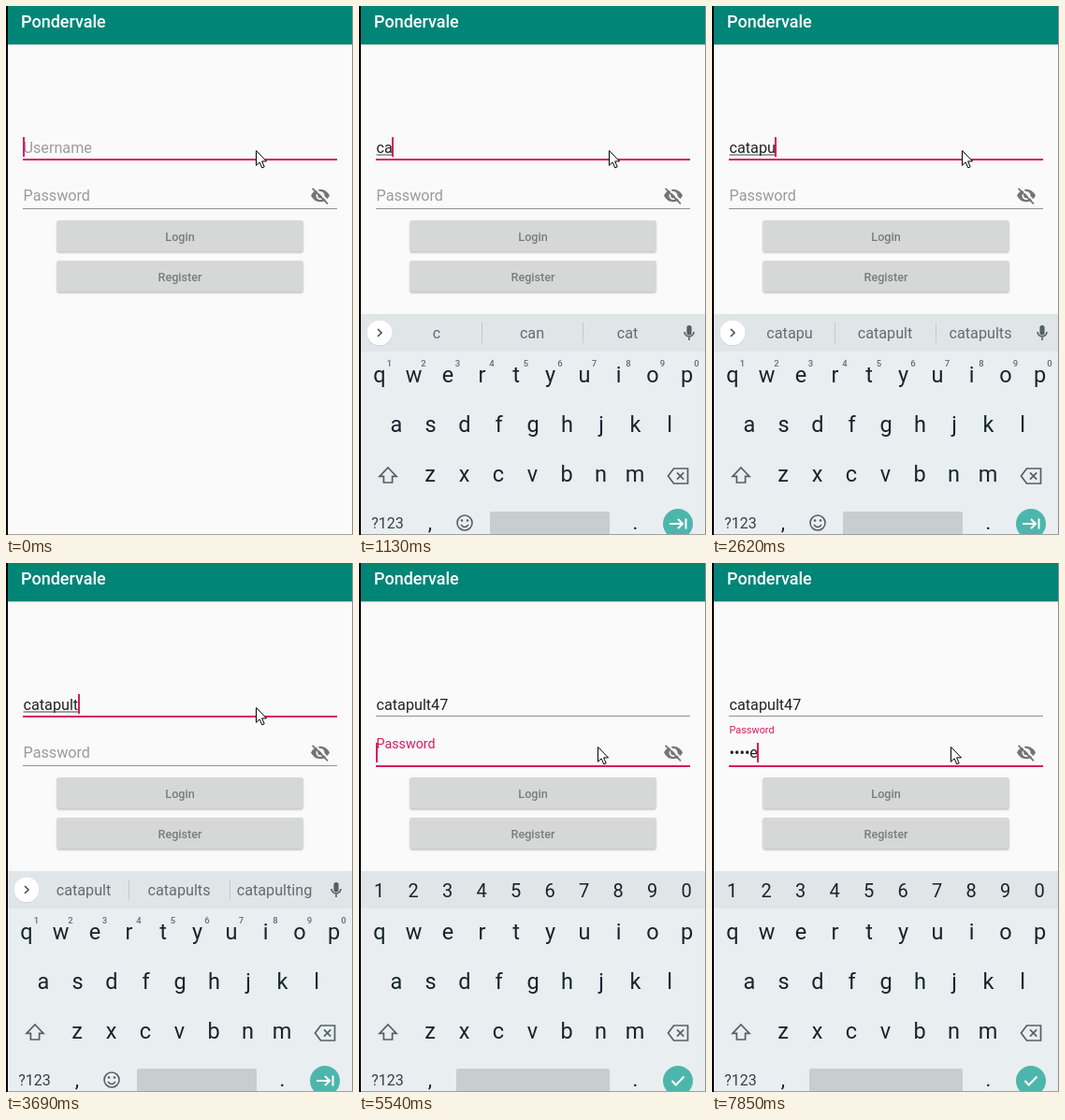
Recreate the animation shown at these times as an HTML page with a canvas. Size 371x565 px, loop 8 s.

```html
<!DOCTYPE html>
<html lang="en">
<head>
<meta charset="utf-8">
<title>Login form</title>
<style>
html, body { margin: 0; width: 100%; height: 100%; overflow: hidden; background: #fafafa; }
canvas { display: block; width: 371px; height: 565px; }
</style>
</head>
<body>
<canvas id="stage"></canvas>
<script>
const W = 371, H = 565, LOOP = 8000;
const canvas = document.getElementById('stage');
const ctx = canvas.getContext('2d');
const dpr = window.devicePixelRatio || 1;
canvas.width = W * dpr;
canvas.height = H * dpr;

const PINK = '#d81b60', INK = '#212121', HINT = '#9b9b9b', KEY = '#17252c', ICON = '#526067';
const USER = 'catapult47', SECRET = 'mouse';
const FIELD_X = 18.5, FIELD_FONT = 16.2;

// start time, typed letters
const typed = [[160, 1], [1130, 2], [1360, 3], [2200, 4], [2450, 5], [2620, 6],
  [2830, 7], [3690, 8], [4030, 9], [4210, 10]];
const secretTyped = [[6550, 1], [6990, 2], [7300, 3], [7570, 4], [7850, 5]];
const hints = [
  [230, 'c can cat'], [1180, 'ca can car'], [1360, 'cat cats catalog'],
  [2200, 'cata catalog catch'], [2450, 'catap catapult catalog'],
  [2620, 'catapu catapult catapults'], [2830, 'catapul catapult catapults'],
  [3690, 'catapult catapults catapulting'], [4030, 'catapult4'], [4210, USER]];
const caretOff = [[660, 1130], [1850, 2200], [3270, 3690], [4710, 5210], [5980, 6490]];

const PRESS = 5270, FOCUS = 5490, SWAP = 5540;

const clamp = v => Math.max(0, Math.min(1, v));
const lerp = (a, b, p) => a + (b - a) * p;
const at = (list, t, none) => list.reduce((v, e) => t >= e[0] ? e[1] : v, none);

function rect(x, y, w, h, color, r = 0) {
  ctx.fillStyle = color;
  ctx.beginPath();
  ctx.roundRect(x, y, w, h, r);
  ctx.fill();
}

function disc(x, y, r, color) {
  ctx.fillStyle = color;
  ctx.beginPath();
  ctx.arc(x, y, r, 0, 7);
  ctx.fill();
}

function text(str, x, y, size, color, align = 'left', weight = 400) {
  ctx.font = `${weight} ${size}px Roboto, sans-serif`;
  ctx.textAlign = align;
  ctx.fillStyle = color;
  ctx.fillText(str, x, y);
}

function widthOf(str) {
  ctx.font = `400 ${FIELD_FONT}px Roboto, sans-serif`;
  return ctx.measureText(str).width;
}

function stroke(path, x, y, color, width = 1.7) {
  ctx.save();
  ctx.translate(x, y);
  ctx.strokeStyle = color;
  ctx.lineWidth = width;
  ctx.stroke(new Path2D(path));
  ctx.restore();
}

function fill(path, x, y, color) {
  ctx.save();
  ctx.translate(x, y);
  ctx.fillStyle = color;
  ctx.fill(new Path2D(path), 'evenodd');
  ctx.restore();
}

function eyeOff(x, y) {
  const c = '#747474';
  fill('M-10 0Q-6.5 -6.8 0 -6.8T10 0Q6.5 6.8 0 6.8T-10 0Z' +
    'M-4.5 0A4.5 4.5 0 0 0 4.5 0A4.5 4.5 0 0 0 -4.5 0Z', x, y, c);
  disc(x, y, 2.7, c);
  stroke('M-7 -9.5L9.5 7', x, y, '#fafafa', 2);
  stroke('M-8.4 -7.6L8 8.8', x, y, c, 1.8);
}

function button(label, y) {
  ctx.save();
  ctx.shadowColor = 'rgba(0,0,0,.28)';
  ctx.shadowBlur = 2 * dpr;
  ctx.shadowOffsetY = dpr;
  rect(54.5, y, 263, 33.5, '#d6d7d7', 2);
  ctx.restore();
  text(label, 186, y + 21.5, 12.6, '#7b7c7c', 'center', 500);
}

function line(y, active) {
  if (active) rect(18, y, 336, 2, PINK);
  else rect(18, y, 336, 1, '#919191');
}

function form(t) {
  const focused = t >= FOCUS;
  const name = USER.slice(0, at(typed, t, 0));
  const n = at(secretTyped, t, 0);
  const secret = n ? '•'.repeat(n - 1) + SECRET[n - 1] : '';

  text(name || 'Username', FIELD_X, 157, FIELD_FONT, name ? INK : HINT);
  if (name && !focused) rect(FIELD_X, 158.5, widthOf(name), 1, '#444');
  line(163, !focused);

  const p = clamp((t - FOCUS + 30) / 200);
  const e = focused ? p * p * (3 - 2 * p) : 0;
  text('Password', FIELD_X, lerp(207.5, 181.5, e), lerp(FIELD_FONT, 10.9, e), focused ? PINK : HINT);
  text(secret, FIELD_X, 208, FIELD_FONT, INK);
  line(216, t >= PRESS);
  eyeOff(336, 202.5);

  if (!caretOff.some(([a, b]) => t >= a && t < b)) {
    const x = FIELD_X + widthOf(focused ? secret : name);
    rect(Math.round(x - .5), focused ? 192 : 140, 2, 21, PINK);
  }
  button('Login', 229);
  button('Register', 272);
}

function mic(x, y) {
  rect(x - 2.6, y - 8, 5.2, 10.5, ICON, 2.6);
  stroke('M-5 -1A5 5 0 0 0 5 -1M0 4V8', x, y, ICON, 1.6);
}

function chevron(dir) {
  disc(22, 350, 13.5, 'rgba(0,0,0,.08)');
  disc(22, 349, 13.3, '#fff');
  stroke(`M${-2 * dir} -4L${2 * dir} 0L${-2 * dir} 4`, 22, 349, '#455158', 1.6);
}

function tools() {
  chevron(-1);
  stroke('M2.6 0A4.6 4.6 0 1 0 -6.6 0A4.6 4.6 0 1 0 2.6 0M1.4 3.3L6.8 8.4', 72, 347.5, ICON, 1.8);
  stroke('M-6.5 -4.5Q-6.5 -6.5 -4.5 -6.5H4.5Q6.5 -6.5 6.5 -4.5V2L2 6.5H-4.5Q-6.5 6.5 -6.5 4.5Z' +
    'M6 2H2V6M-3.5 1Q-1 4 2 1', 126, 349, ICON, 1.6);
  disc(123.5, 347, 1.1, ICON);
  disc(128.5, 347, 1.1, ICON);
  text('GIF', 179, 353, 12, ICON, 'center', 900);
  rect(227, 342, 14, 14, ICON, 1);
  rect(267, 338, 1, 22, '#c3c9cc');
  for (let i = -1; i < 2; i++) disc(300 + i * 5.5, 349.5, 1.8, ICON);
  mic(353, 349);
}

function suggestions(words) {
  chevron(1);
  if (words.length === 1) {
    text(words[0], 185, 355, 16.2, '#636c71', 'center');
  } else {
    words.forEach((w, i) => text(w, 83 + i * 102, 355, 16.2, '#636c71', 'center'));
    rect(131, 338, 1, 22, '#c3c9cc');
    rect(239, 338, 1, 22, '#c3c9cc');
  }
  mic(353, 349);
}

function keyRow(letters, x, y, size = 23.5) {
  [...letters].forEach((c, i) => text(c, x + i * 36.5, y, size, KEY, 'center'));
}

function keyboard(t) {
  const p = clamp((t - 60) / 155);
  const secure = t >= SWAP;
  ctx.save();
  ctx.beginPath();
  ctx.rect(2, 0, 368, 564);
  ctx.clip();
  ctx.globalAlpha = clamp(p + .2);
  ctx.translate(0, 24 * (1 - p) ** 2);

  rect(0, 329, W, 240, '#e9eef1');
  rect(0, 329, W, 40, '#e0e5e8');
  const words = at(hints, t, '');
  if (secure) keyRow('1234567890', 21.5, 357, 20);
  else if (words) suggestions(words.split(' '));
  else tools();

  keyRow('qwertyuiop', 22, 402);
  keyRow('asdfghjkl', 40, 455);
  keyRow('zxcvbnm', 76, 508);
  if (!secure) {
    [...'1234567890'].forEach((c, i) => text(c, 32.5 + i * 36.5, 385, 9.5, '#626d73', 'center', 500));
  }

  stroke('M0 -8.5L9 .8H4.6V7.5H-4.6V.8H-9Z', 31, 501.5, ICON);
  stroke('M-10.5 0L-4.5 -8H10.5V8H-4.5ZM-1 -3.6L6.2 3.6M6.2 -3.6L-1 3.6', 341, 502, ICON);

  text('?123', 30.5, 558, 16, '#34434b', 'center');
  text(',', 76, 559, 22, KEY, 'center');
  text('.', 295.5, 559, 22, KEY, 'center');
  const left = secure ? 104 : 140;
  rect(left, 540, 268 - left, 40, '#c8cdd0', 2);
  disc(341, 553, 16, '#4db6ac');
  if (secure) {
    stroke('M-6.5 0L-2.2 4.5L6.5 -4.5', 341, 553, '#fff', 2);
  } else {
    stroke('M-9 0H5M0 -5L5 0L0 5M8.5 -5.5V5.5', 341, 553, '#fff', 2);
    stroke('M8 0A8 8 0 1 0 -8 0A8 8 0 1 0 8 0M-4 2Q0 7 4 2', 113, 552, ICON, 1.6);
    disc(110, 549.5, 1.3, ICON);
    disc(116, 549.5, 1.3, ICON);
  }
  ctx.restore();
}

function pointer(t) {
  const held = Math.floor((t - 4710) / 70) * 70;
  const p = clamp(held / 340);
  const x = lerp(267.5, 255.5, Math.min(1, p / .6));
  const y = lerp(154.5, 196.5, 1 - (1 - p) ** 1.3);
  const arrow = 'M0 0V15.8L3.6 12.4L6.3 18.4L8.7 17.3L6.1 11.4H11Z';
  fill(arrow, x, y, '#fff');
  stroke(arrow, x, y, '#000', 1);
}

function draw(t) {
  ctx.setTransform(dpr, 0, 0, dpr, 0, 0);
  rect(0, 0, W, H, '#fafafa');
  rect(0, 41, W, 1, '#dedede');
  rect(0, 42, W, 1, '#f0f0f0');
  rect(0, 0, W, 41, '#008577');
  text('Pondervale', 16, 23, 18, '#fff', 'left', 500);
  form(t);
  if (t >= 60) keyboard(t);
  pointer(t);
  rect(0, 0, 2, H, '#000');
  rect(370, 0, 1, H, '#8c8c8c');
  rect(2, 564, 369, 1, '#a0a0a0');
}

const start = performance.now();
function tick() {
  draw((performance.now() - start) % LOOP);
  requestAnimationFrame(tick);
}
tick();
</script>
</body>
</html>
```
